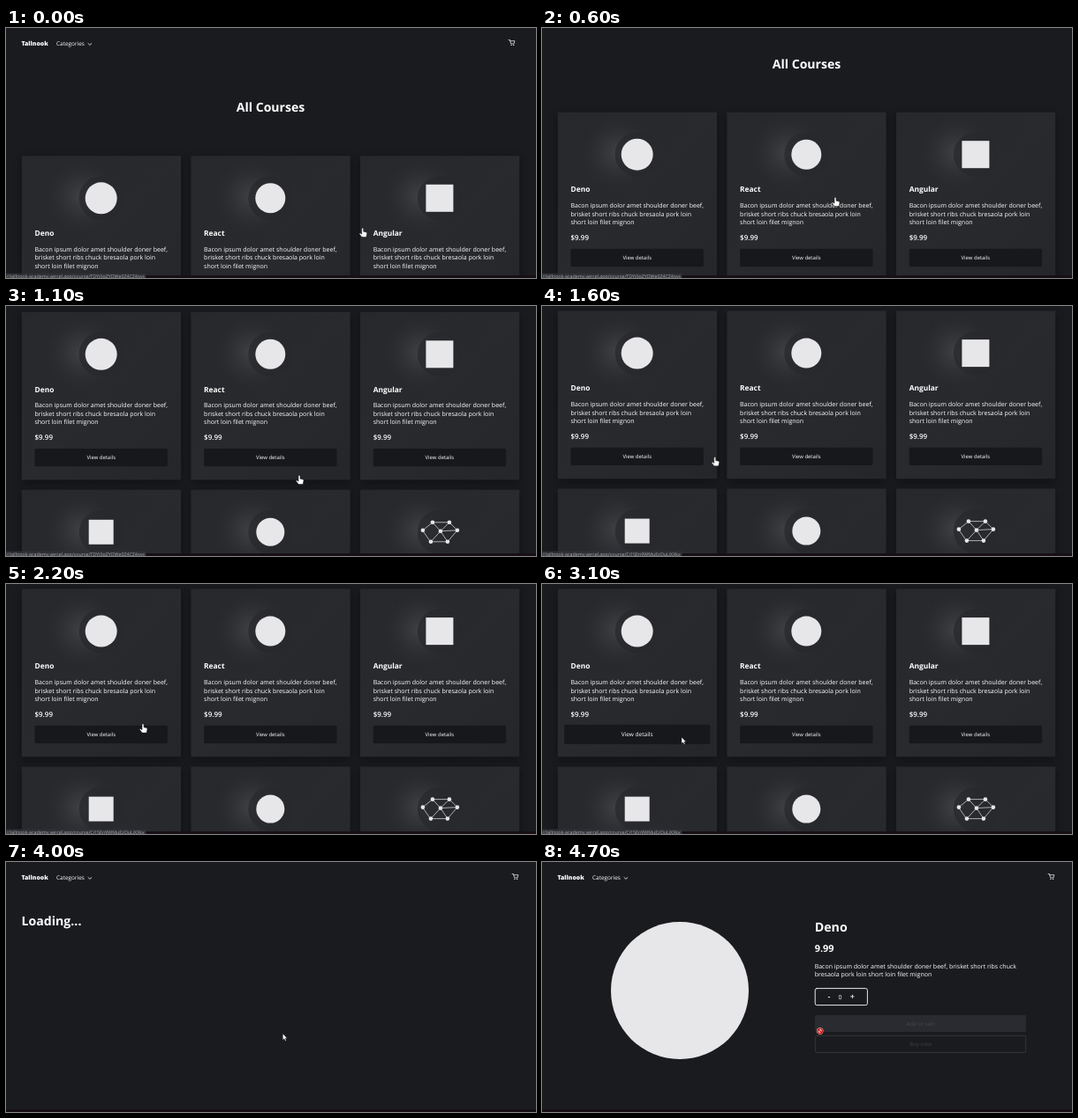
These frames come from a looping animation (600 by 284 pixels, 5 s). An HTML page:

```html
<!DOCTYPE html>
<html lang="en">
<head>
<meta charset="utf-8">
<title>Course shop</title>
<style>
  html, body { margin: 0; width: 100%; height: 100%; overflow: hidden; background: #1a1b1f; }
  svg { display: block; width: 600px; height: 284px; }
  text { font-family: "Open Sans", "Noto Sans", sans-serif; fill: #fff; text-rendering: geometricPrecision; white-space: pre; }
  .mid { text-anchor: middle; }
  .card { filter: drop-shadow(0 3px 5px rgba(0, 0, 0, .38)); }
  .line { fill: none; stroke: #fff; stroke-linecap: round; stroke-linejoin: round; }
</style>
</head>
<body>
<svg id="stage" viewBox="0 0 600 284"></svg>
<script>
const LOOP = 5000, STEP = 100, SCROLL = 139.7, LIGHT = '#e7e6e8';
const stage = document.getElementById('stage');

const text = (x, y, size, weight, str, extra = '') =>
  `<text x="${x}" y="${y}" font-size="${size}" font-weight="${weight}" ${extra}>${str}</text>`;
const disc = r => `<circle r="${r}" fill="${LIGHT}"/>`;
const square = s => `<rect x="${-s / 2}" y="${-s / 2}" width="${s}" height="${s}" fill="${LIGHT}"/>`;

function network() {
  const nodes = [[-19, -2], [-8, -11], [11, -11], [20, -2], [9, 11], [-10, 11], [1, -1]];
  const [a, b, c, d, e, f, hub] = nodes;
  return `<path d="M${a}L${b}L${c}L${d}L${e}L${f}ZM${b}L${hub}L${c}M${f}L${hub}L${d}M${e}L${hub}"
      class="line" style="stroke:${LIGHT}" stroke-width=".7"/>` +
    nodes.map(([x, y]) => `<circle cx="${x}" cy="${y}" r="2.3" fill="${LIGHT}"/>`).join('');
}

const courses = [
  ['Deno', disc(18)], ['React', disc(17)], ['Angular', square(31)],
  ['', square(28)], ['', disc(16)], ['', network()]
];
const blurb = ['Bacon ipsum dolor amet shoulder doner beef,', 'brisket short ribs chuck bresaola pork loin', 'short loin filet mignon'];

const card = ([name, icon], i) => `
  <g transform="translate(${17.8 + i % 3 * 191.6} ${145.3 + Math.floor(i / 3) * 202})">
    <rect class="card" width="180.2" height="190.7" rx="1" fill="url(#panel)"/>
    <circle cx="68" cy="46" r="44" fill="url(#glow)"/>
    <g transform="translate(89.9 48)"><circle r="25" fill="#27282c" opacity=".75"/>${icon}</g>
    ${text(14.7, 90.8, 8.4, 700, name)}
    ${blurb.map((line, n) => text(14.7, 108.3 + n * 9.7, 7, 400, line)).join('')}
    ${text(14.7, 145.6, 8, 600, '$9.99')}
    <g class="button" transform="translate(89.9 165.3)">
      <rect x="-75.2" y="-10.2" width="150.4" height="20.4" rx="1.6" fill="#17181b"/>
      ${text(0, 2.2, 5.95, 500, 'View details', 'class="mid"')}
    </g>
  </g>`;

const header = cartX => `
  ${text(17.5, 19.9, 6.9, 800, 'Tallnook')}
  ${text(57, 19.9, 6.45, 400, 'Categories')}
  <path class="line" d="M93 17.6l1.9 1.8 1.9-1.8" stroke-width=".8"/>
  <g transform="translate(${cartX} 13)">
    <path class="line" d="M.3.5H1.6L2.8 4.9H6.3L7 1.7H2" stroke-width=".7"/>
    <circle cx="3.2" cy="6.4" r=".6" fill="#fff"/><circle cx="5.9" cy="6.4" r=".6" fill="#fff"/>
  </g>`;

stage.innerHTML = `
  <defs>
    <linearGradient id="panel" x2="1" y2="1">
      <stop stop-color="#27282c"/><stop offset=".5" stop-color="#292a2e"/><stop offset="1" stop-color="#25262a"/>
    </linearGradient>
    <radialGradient id="glow">
      <stop stop-color="#4a4a4d" stop-opacity=".75"/><stop offset=".45" stop-color="#3c3d40" stop-opacity=".45"/>
      <stop offset="1" stop-color="#2a2b2f" stop-opacity="0"/>
    </radialGradient>
  </defs>
  <rect width="600" height="284" fill="#1a1b1f"/>
  <g id="list">
    ${header(568.8)}
    ${text(299.5, 95.4, 14.05, 700, 'All Courses', 'class="mid"')}
    ${courses.map(card).join('')}
  </g>
  <g id="page">${header(572.8)}</g>
  <g id="loading">${text(17.5, 72.2, 14.15, 700, 'Loading...')}</g>
  <g id="detail">
    <circle cx="156" cy="146" r="78" fill="${LIGHT}"/>
    ${text(308.7, 79.4, 14.2, 700, 'Deno')}
    ${text(308.7, 102.4, 10.9, 700, '9.99')}
    ${text(308.7, 120.5, 7, 400, blurb[0] + ' brisket short ribs chuck')}
    ${text(308.7, 130.3, 7, 400, 'bresaola pork loin short loin filet mignon')}
    <rect class="line" x="309.2" y="143.6" width="59.2" height="19" rx="2" stroke-width=".9"/>
    ${text(325, 156.4, 9, 600, '-', 'class="mid"')}
    ${text(337.5, 156, 7, 400, '0', 'class="mid"')}
    ${text(351.2, 156.4, 9, 600, '+', 'class="mid"')}
    <rect x="309" y="174" width="239" height="19" rx="1.6" fill="#2a2b30"/>
    ${text(428.5, 185.8, 6.1, 600, 'Add to cart', 'class="mid" style="fill:#404146"')}
    <rect class="line" x="309.3" y="197.4" width="238.4" height="19" rx="1.6" style="stroke:#3a3b40" stroke-width=".8"/>
    ${text(428.5, 209.2, 6.1, 600, 'Buy now', 'class="mid" style="fill:#36373c"')}
  </g>
  <rect y="281" width="600" height="3" fill="#170f15"/>
  <g id="status">
    <rect y="278.7" width="158.5" height="6" fill="#303136"/>
    ${text(.5, 284, 5.3, 400, '', 'id="link" style="fill:#a9abb0"')}
  </g>
  <g id="cursor">
    <path id="hand" d="M-1 1Q0-.6 1 1V4.2L4.2 5Q5 5.3 5 6.3L4.2 10.6H-.8L-3.6 7Q-4 5.8-2.7 6L-1 7.2Z"
      fill="#fff" stroke="#111" stroke-width=".5"/>
    <path id="arrow" d="M0 0V7.2L1.7 5.7 2.8 8.2 4 7.7 2.9 5.2H5.1Z" fill="#fff" stroke="#111" stroke-width=".4"/>
    <g id="blocked">
      <circle r="3.7" fill="#fff"/><circle r="2.7" fill="#fff" stroke="#c3211f" stroke-width="1.6"/>
      <path d="M-1.9-1.9L1.9 1.9" stroke="#c3211f" stroke-width="1.6"/>
    </g>
  </g>`;

const el = id => document.getElementById(id);
const show = (id, on) => el(id).style.display = on ? '' : 'none';
const smooth = (t, from, to) => {
  const p = Math.min(1, Math.max(0, (t - from) / (to - from)));
  return p * p * (3 - 2 * p);
};

// Pointer stops: time, x, y
const stops = [
  [0, 403.7, 227], [600, 332, 192], [1200, 332, 192], [1800, 148, 164], [2200, 155, 158.5],
  [2500, 158, 174], [3400, 158, 174], [3700, 345.5, 193], [3900, 345.5, 193],
  [4000, 313.3, 195], [4600, 314.7, 192], [LOOP, 314.7, 192]
];
function pointer(t) {
  const i = stops.findIndex(stop => stop[0] > t);
  const [t0, x0, y0] = stops[i - 1], [t1, x1, y1] = stops[i];
  const p = smooth(t, t0, t1);
  return [x0 + (x1 - x0) * p, y0 + (y1 - y0) * p];
}

const firstButton = document.querySelector('.button');

function draw(now) {
  const t = Math.floor(now % LOOP / STEP) * STEP;
  const onList = t < 3200, loaded = t >= 4600;
  show('list', onList);
  show('page', !onList);
  show('loading', !onList && !loaded);
  show('detail', loaded);
  show('status', t < 3600);
  show('hand', t < 2400);
  show('arrow', t >= 2400 && !loaded);
  show('blocked', loaded);
  el('list').setAttribute('transform', `translate(0 ${-SCROLL * smooth(t, 230, 1150)})`);
  firstButton.setAttribute('transform', `translate(89.9 165.3) scale(${1 + .097 * smooth(t, 2400, 2600)})`);
  el('cursor').setAttribute('transform', `translate(${pointer(t)})`);
  el('link').textContent = '//tallnook-academy.vercel.app/course/' +
    (t < 1600 ? 'TDYi0qZYOWe0Z4CZ4ovs' : 'Cj15En9WMuEzOuLiXXkx');
  requestAnimationFrame(draw);
}
requestAnimationFrame(draw);
</script>
</body>
</html>
```
